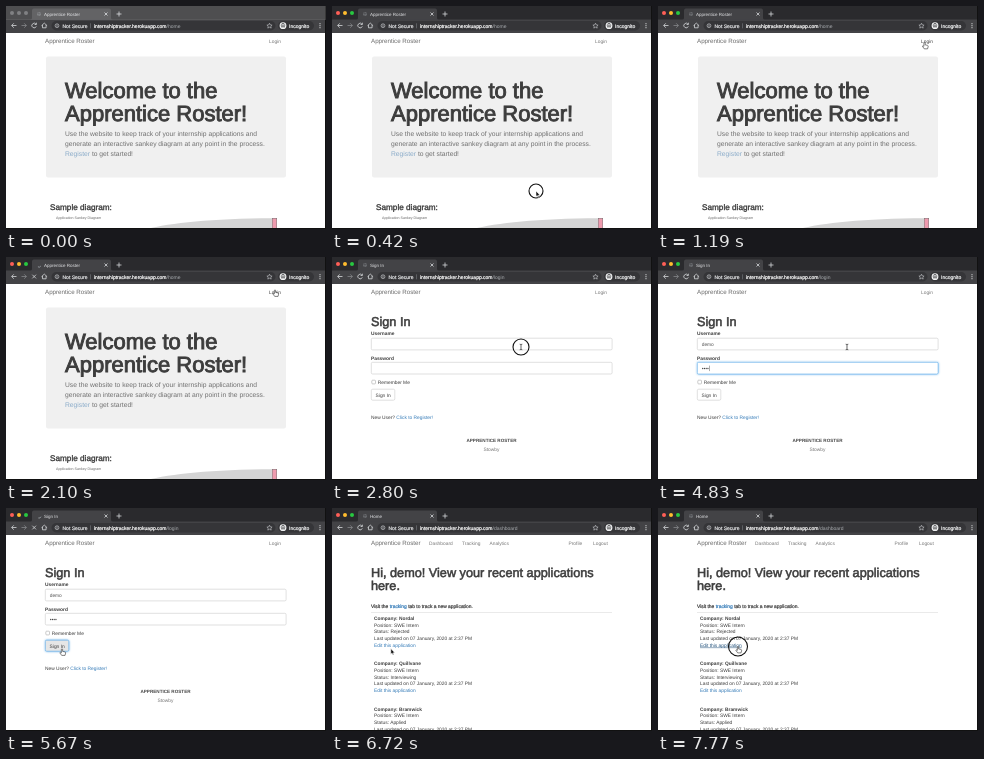
These frames come from a looping animation (320 px wide and 223 px high, 8 s). An HTML page:

```html
<!DOCTYPE html>
<html lang="en">
<head>
<meta charset="utf-8">
<title>Apprentice Roster</title>
<style>
  html, body { margin: 0; width: 100%; height: 100%; overflow: hidden; background: #fff; }
  svg { display: block; width: 320px; height: 223px; }
  text { font-family: "Liberation Sans", Arial, sans-serif; text-rendering: geometricPrecision; white-space: pre; }
  .medium { stroke: currentColor; paint-order: stroke; }
  .icon { fill: none; stroke: #d5d7da; stroke-width: .8; }
</style>
</head>
<body>
<svg id="stage" viewBox="0 0 320 223"></svg>
<script>
const LOOP = 8000;
const INK = '#3c3c3c', LINK = '#337ab7', BODY = 4.85;
const STRIP = '#2a2a2d', BAR = '#434346', PILL = '#353538';

const rect = (x, y, w, h, fill, more = '') =>
  `<rect x="${x}" y="${y}" width="${w}" height="${h}" fill="${fill}" ${more}/>`;
const dot = (x, y, r, fill, more = '') =>
  `<circle cx="${x}" cy="${y}" r="${r}" fill="${fill}" ${more}/>`;
const icon = (d, more = '') => `<path class="icon" d="${d}" ${more}/>`;
const label = (x, y, text, size = BODY, fill = INK, more = '') =>
  `<text x="${x}" y="${y}" font-size="${size}" fill="${fill}" ${more}>${text}</text>`;
const heading = (x, y, text, size, fill = INK) =>
  label(x, y, text, size, fill, `class="medium" color="${fill}" stroke-width="${size * .042}"`);
const group = (id, body, more = '') => `<g id="${id}" ${more}>${body}</g>`;
const bold = 'font-weight="700"';

// Browser frame
const lights = ['#ff5f57', '#febc2e', '#28c840'];
const browser =
  rect(0, 0, 320, 14, STRIP) +
  lights.map((c, i) => dot(6 + i * 7, 7, 2, c, 'class="light"')).join('') +
  `<path d="M24 14q2 0 2-2V4.500q0-2 2-2h75q2 0 2 2V12q0 2 2 2z" fill="${BAR}"/>` +
  rect(0, 13.5, 320, 13.5, BAR) +
  group('globe', dot(33, 8, 2, '#6d6f73') + icon('M31.300 7.500h3.400M32.500 6.200q1 2 0 3.600', `style="stroke:${BAR};stroke-width:.5"`)) +
  group('spinner', icon('M33 5.900a2.100 2.100 0 0 1 2.100 2.100', 'style="stroke:#9aa0a6"')) +
  label(38, 9.8, '', 4.5, '#e4e5e7', 'id="tab"') +
  icon('M98.500 6.500l3 3m0-3l-3 3M110.500 8h5M113 5.500v5') +
  icon('M10.500 19.500H5.800m2-2.200l-2.200 2.200 2.200 2.200') +
  icon('M15.500 19.500h4.700m-2-2.200l2.200 2.200-2.200 2.200', 'opacity=".45"') +
  group('reload', icon('M30 18.200a2.300 2.300 0 1 0 .3 2.100M30.400 16.700v1.800h-1.800')) +
  group('stop', icon('M26.300 17.700l3.700 3.700m0-3.700l-3.700 3.700')) +
  icon('M35.500 19.700l2.800-2.600 2.800 2.600m-4.600-.8v2.900h3.600v-2.900') +
  rect(45.5, 15, 224, 9.5, PILL, 'rx="4.7"') +
  dot(51, 19.7, 1.9, 'none', 'stroke="#d5d7da" stroke-width=".6"') +
  rect(50.7, 18.500, .6, 2.4, '#d5d7da') +
  heading(56.5, 21.5, 'Not Secure', 5, '#e4e5e7') +
  rect(84.2, 17.3, .5, 5, '#85888c') +
  label(88, 21.5, '<tspan class="medium" color="#fff" fill="#fff" stroke-width=".2">internshiptracker.herokuapp.com</tspan><tspan id="path"></tspan>', 5, '#a8abaf') +
  icon('M263.500 17.200l.8 1.700 1.800.2-1.300 1.200.4 1.800-1.700-.9-1.700.9.4-1.800-1.300-1.200 1.800-.2z', 'style="stroke-width:.55"') +
  rect(272, 15, 36, 9.5, PILL, 'rx="4.7"') +
  dot(277, 19.7, 3.4, '#f1f2f3') +
  icon('M274.700 19.200h4.600M275.700 18.500l.4-1h1.800l.4 1', `style="stroke:${PILL};stroke-width:.7"`) +
  dot(276, 20.8, .75, PILL) + dot(278, 20.8, .75, PILL) +
  heading(283, 21.5, 'Incognito', 5, '#f1f2f3') +
  [17.7, 19.7, 21.7].map(y => dot(314, y, .6, '#d5d7da')).join('');

const brand = label(39, 37.2, 'Apprentice Roster', 6.2, '#6a6a6a');
const navItem = (x, text) => label(x, 36.8, text, BODY, '#777');
const login = label(263, 36.8, 'Login', BODY, '#777', 'class="login"');

const home =
  brand + login +
  rect(40, 50.500, 240, 121, '#f0f0f0', 'rx="2"') +
  heading(59, 92, 'Welcome to the', 22) +
  heading(59, 115, 'Apprentice Roster!', 22) +
  ['Use the website to keep track of your internship applications and',
   'generate an interactive sankey diagram at any point in the process.',
   `<tspan fill="#8aabc9">Register</tspan> to get started!`]
    .map((s, i) => label(59, 129.5 + i * 10, s, 6.72, '#707070')).join('') +
  heading(44, 203.5, 'Sample diagram:', 8.2) +
  label(50, 213, 'Application Sankey Diagram', 3.6, '#666') +
  '<path d="M140 223C165 217 205 212.500 266 212.200V223z" fill="#d4d4d4"/>' +
  rect(266.2, 212.2, 4.6, 12, '#ee9aad', 'stroke="#555" stroke-width=".4"');

// Sign-in page
const names = ['demo', 'demoEvening', 'demo456', 'demoing', 'd4rkm0untain7', 'lorem8'];
const ROW = 12.1;
const field = (id, y) => rect(39.3, y, 240.8, 11.7, '#fff', `id="${id}" rx="1.3" stroke-width=".6"`);
const signin =
  brand + login +
  heading(39, 69, 'Sign In', 12.7) +
  label(39, 78, 'Username', BODY, INK, bold) + field('userBox', 81.2) +
  label(43.7, 88.8, '', BODY, '#555', 'id="user"') +
  label(39, 102.6, 'Password', BODY, INK, bold) + field('passBox', 105.3) +
  [0, 1, 2, 3].map(i => dot(44.7 + i * 1.75, 111.5, .65, '#444', 'class="pass"')).join('') +
  rect(0, 0, .4, 5.5, '#333', 'id="caret"') +
  rect(39.8, 123.2, 3.7, 3.7, '#fff', 'rx=".8" stroke="#999" stroke-width=".5"') +
  label(45.8, 126.9, 'Remember Me') +
  rect(39.3, 132.2, 23.5, 11, '#fff', 'id="button" rx="1.4" stroke-width=".6"') +
  label(43.6, 139.5, 'Sign In') +
  label(39, 161.8, `New User? <tspan fill="${LINK}">Click to Register!</tspan>`) +
  label(159.5, 184.8, 'APPRENTICE ROSTER', 4.6, '#444', bold + ' text-anchor="middle"') +
  label(159.5, 193.6, 'Stowby', BODY, '#777', 'text-anchor="middle"') +
  group('menu', rect(39, 93, 64, 10, '#33383b', 'id="menuBack" rx="1.2"') +
    names.map((n, i) => label(43, 102.8 + i * ROW, n, 4.7, '#f4f4f4', bold + ' class="option"')).join(''));

// Dashboard page
const entry = ([company, status], i) => {
  const y = n => 112 + i * 45.3 + n * 6.65;
  return label(42, y(0), 'Company: ' + company, BODY, INK, bold) +
    label(42, y(1), 'Position: SWE Intern') +
    label(42, y(2), 'Status: ' + status) +
    label(42, y(3), 'Last updated on 07 January, 2020 at 2:37 PM') +
    label(42, y(4), 'Edit this application', BODY, LINK, 'class="edit"');
};
const dashboard =
  brand +
  [[97, 'Dashboard'], [130, 'Tracking'], [157.5, 'Analytics'], [236.5, 'Profile'], [261, 'Logout']]
    .map(a => navItem(...a)).join('') +
  heading(39, 69, 'Hi, demo! View your recent applications', 12.7) +
  heading(39, 82.3, 'here.', 12.7) +
  heading(39, 100, `Visit the <tspan fill="${LINK}" color="${LINK}">tracking</tspan> tab to track a new application.`, 4.9) +
  rect(39, 104, 241, .6, '#ddd') +
  [['Nordal', 'Rejected'], ['Quillvane', 'Interviewing'], ['Bramwick', 'Applied']].map(entry).join('');

const edge = 'stroke-width=".7" stroke-linejoin="round"';
const small = 'transform="scale(.8)"';
const cursor =
  group('arrow', `<path d="M0 0V7l1.600-1.400L2.600 8l1.300-.5-1-2.300H5z" fill="#111" stroke="#fff" ${edge} ${small}/>`) +
  group('hand', `<path d="M-.8.300Q0-.6.800.300V3L3.800 3.700Q4.800 4 4.500 5.200L3.800 8H-.4L-2.700 4.700Q-2.300 3.600-.8 4.800z" fill="#fff" stroke="#222" ${edge} ${small}/>`) +
  group('beam', `<path d="M-1.300-2.800Q0-2.800 0-2V2Q0 2.800-1.300 2.800M1.300-2.800Q0-2.800 0-2M0 2Q0 2.800 1.300 2.800" fill="none" stroke="#222" stroke-width=".7"/>`);

const stage = document.getElementById('stage');
stage.innerHTML = rect(0, 0, 320, 223, '#fff') +
  group('home', home) + group('signin', signin) + group('dashboard', dashboard) +
  browser + rect(0, 222, 320, 1, '#111') + rect(319, 0, 1, 223, '#111') +
  dot(0, 0, 7, 'none', 'id="ring" stroke="#111" stroke-width="1.1"') + group('cursor', cursor) +
  rect(0, 0, 320, 14, '#fff', 'id="veil"');

// Timing: [start, value]
const pages = [[0, 'home'], [2450, 'signin'], [6510, 'dashboard']];
const paths = [[0, '/home'], [2380, '/login'], [6370, '/dashboard']];
const titles = { home: 'Apprentice Roster', signin: 'Sign In', dashboard: 'Home' };
const loading = [[0, false], [1890, true], [2660, false], [5670, true], [6510, false]];
const typed = [[0, 0], [3360, 1], [3500, 2], [3640, 3], [3710, 4]];
const secret = [[0, 0], [4200, 1], [4410, 2], [4550, 3], [4620, 4]];
const options = [[0, 0], [2870, 6], [3360, 5], [3500, 4], [3990, 0]];
const focus = [[0, ''], [2870, 'user'], [3990, 'pass'], [5530, 'button']];
const shapes = [[0, ''], [140, 'arrow'], [1190, 'hand'], [2450, 'arrow'], [2730, 'beam'], [3360, ''],
  [4830, 'beam'], [5040, 'arrow'], [5390, 'hand'], [6510, 'arrow'], [7000, 'hand']];
const rings = [[0, 0], [280, 7], [490, 0], [1890, 7], [2030, 0], [2800, 8], [2940, 0],
  [5530, 8], [5670, 0], [7700, 9.5]];
const route = [[0, 204, 185], [490, 204, 185], [1260, 268, 33], [1610, 268, 33], [1750, 269, 33],
  [2240, 269, 33], [2800, 189, 90], [4830, 189, 90], [5460, 56, 141], [6580, 56, 141],
  [7210, 78, 138], [7350, 78, 138], [7630, 80, 138.5], [LOOP, 80, 138.5]];

const at = (table, t) => table.filter(row => row[0] <= t).pop()[1];
const ease = u => u * u * (3 - 2 * u);
function place(t) {
  const i = Math.max(1, route.findIndex(p => p[0] > t));
  const [a, b] = [route[i - 1], route[i]];
  const u = ease((t - a[0]) / (b[0] - a[0]));
  return [a[1] + (b[1] - a[1]) * u, a[2] + (b[2] - a[2]) * u];
}

const $ = id => document.getElementById(id);
const all = selector => [...stage.querySelectorAll(selector)];
const show = (el, on) => el.setAttribute('display', on ? 'inline' : 'none');
const set = (el, values) => Object.entries(values).forEach(([k, v]) => el.setAttribute(k, v));
const optionEls = all('.option'), passEls = all('.pass'), lightEls = all('.light');
const loginEls = all('.login'), editLink = all('.edit')[0];

function outline(el, on, fill = '#fff') {
  set(el, { stroke: on ? '#66afe9' : '#ccc', fill });
  el.style.filter = on ? 'drop-shadow(0 0 1px #66afe9)' : 'none';
}

function render(t) {
  const page = at(pages, t), busy = at(loading, t), active = at(focus, t);
  Object.keys(titles).forEach(id => show($(id), id === page));
  $('tab').textContent = titles[page];
  $('path').textContent = at(paths, t);
  show($('globe'), !busy);
  show($('spinner'), busy);
  show($('reload'), !busy);
  show($('stop'), busy);
  set($('spinner'), { transform: `rotate(${t * .4} 33 8)` });
  lightEls.forEach((el, i) => set(el, { fill: t < 140 ? '#66676a' : lights[i] }));
  set($('veil'), { opacity: .17 * Math.min(1, Math.max(0, (280 - t) / 210)) });

  const dots = at(secret, t), rows = at(options, t);
  $('user').textContent = names[0].slice(0, at(typed, t));
  passEls.forEach((el, i) => show(el, i < dots));
  outline($('userBox'), active === 'user');
  outline($('passBox'), active === 'pass');
  outline($('button'), active === 'button', active === 'button' ? '#e6e6e6' : '#fff');
  show($('caret'), active === 'user' || active === 'pass');
  if (page === 'signin') {
    set($('caret'), active === 'user'
      ? { x: 43.9 + $('user').getComputedTextLength(), y: 84.3 }
      : { x: 44 + dots * 1.75, y: 108.6 });
  }
  show($('menu'), rows);
  set($('menuBack'), { height: 4.8 + rows * ROW });
  optionEls.forEach((el, i) => show(el, i < rows));

  const [x, y] = place(t), shape = at(shapes, t), r = at(rings, t);
  ['arrow', 'hand', 'beam'].forEach(id => show($(id), id === shape));
  set($('cursor'), { transform: `translate(${x} ${y})` });
  set($('ring'), { cx: x, cy: y, r });
  show($('ring'), r);
  const overLogin = page === 'home' && shape === 'hand';
  loginEls.forEach(el => set(el, { fill: overLogin ? INK : '#777' }));
  const overEdit = page === 'dashboard' && shape === 'hand';
  set(editLink, { fill: overEdit ? '#23527c' : LINK, 'text-decoration': overEdit ? 'underline' : 'none' });
}

const begin = performance.now();
function tick() {
  render((performance.now() - begin) % LOOP);
  requestAnimationFrame(tick);
}
render(0);
requestAnimationFrame(tick);
</script>
</body>
</html>
```
